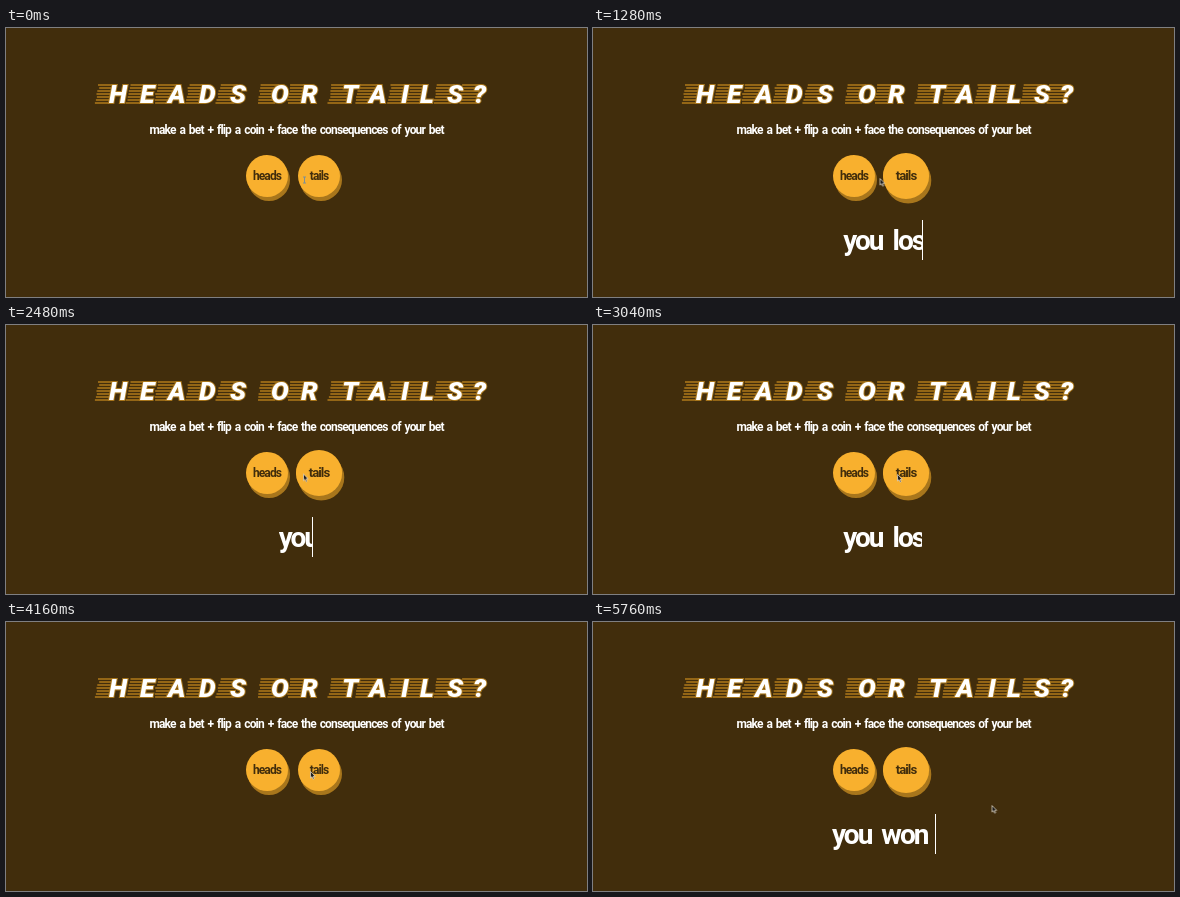
These frames come from a looping animation (581x269 px, 5.8 s). An HTML page:

```html
<!DOCTYPE html>
<html lang="en">
<head>
<meta charset="utf-8">
<title>Heads or tails?</title>
<style>
  :root { --bg: #412d0c; --gold: #f8b02e; --dim: #a8761c; --loop: 5800ms; }
  html, body { margin: 0; width: 100%; height: 100%; overflow: hidden; background: var(--bg); }
  body { position: relative; font: 700 12px Roboto, "Liberation Sans", sans-serif; color: #fff; }
  svg { position: absolute; left: 0; top: 0; overflow: visible; }

  .title { font: italic 900 26.5px Roboto, "Liberation Sans", sans-serif; fill: #fff;
    stroke: var(--dim); stroke-width: 2px; paint-order: stroke; }
  #streaks { stroke: #b07a1a; stroke-width: 1.6; fill: none; }

  .lead { position: absolute; left: 0; width: 581px; top: 92px; margin: 0; line-height: 20px;
    text-align: center; white-space: nowrap; letter-spacing: -.85px; word-spacing: 1.7px; }

  .coin { position: absolute; top: 126.5px; width: 42px; height: 42px; border-radius: 50%;
    background: var(--gold); color: var(--bg); box-shadow: 2px 4px 0 var(--dim);
    line-height: 42px; text-align: center; letter-spacing: -.9px; }
  .heads { left: 240px; }
  .tails { left: 291.5px; animation: landed var(--loop) step-end infinite; }

  .result { position: absolute; left: 0; top: 192px; width: 581px; height: 40px;
    display: flex; justify-content: center; }
  .result span { flex: none; width: 0; height: 40px; overflow: hidden; white-space: nowrap;
    border-right: 1px solid #fff; font-size: 28px; line-height: 42px; opacity: 0;
    letter-spacing: -2px; word-spacing: 5px; }
  .lose { --full: 90px;
    animation: lose var(--loop) step-end infinite, blink calc(var(--loop) / 9) -134ms step-end infinite; }
  .won { --full: 103px;
    animation: won var(--loop) step-end infinite, blink calc(var(--loop) / 9) -134ms step-end infinite; }

  .mouse { animation: move var(--loop) ease-in-out infinite; }
  .arrow { fill: #1d1d1d; stroke: #e8e0d0; stroke-width: .7; animation: arrow var(--loop) step-end infinite; }
  .beam { fill: none; stroke: #7f9096; stroke-width: 1; animation: beam var(--loop) step-end infinite; }

  @keyframes landed {
    0%, 32.2%, 71% { transform: none; }
    5.52%, 36.2%, 77.59% { transform: scale(1.1); }
  }
  @keyframes lose {
    0%, 32.2%, 71%, 100% { width: 0; opacity: 0; }
    5.52%, 36.2% { width: 0; opacity: 1; animation-timing-function: steps(8); }
    22.76%, 53.45% { width: var(--full); opacity: 1; }
  }
  @keyframes won {
    0% { width: 0; opacity: 0; }
    77.59% { width: 0; opacity: 1; animation-timing-function: steps(8); }
    94.83%, 100% { width: var(--full); opacity: 1; }
  }
  @keyframes blink {
    0% { border-color: #fff; }
    50%, 100% { border-color: transparent; }
  }
  @keyframes move {
    0% { transform: translate(298px, 149px); }
    22.07% { transform: translate(286.5px, 150px); }
    30%, 34.5% { transform: translate(261px, 146px); }
    46%, 88.5% { transform: translate(304px, 149px); }
    98%, 100% { transform: translate(398.5px, 183px); }
  }
  @keyframes arrow { 0% { opacity: 0; } 11%, 100% { opacity: 1; } }
  @keyframes beam { 0% { opacity: 1; } 11%, 100% { opacity: 0; } }
</style>
</head>
<body>
<svg width="581" height="269" viewBox="0 0 581 269">
  <path id="streaks"/>
  <text class="title" id="title" y="75">HEADSORTAILS?</text>
</svg>
<p class="lead">make a bet + flip a coin + face the consequences of your bet</p>
<div class="coin heads">heads</div>
<div class="coin tails">tails</div>
<div class="result"><span class="lose">you lose</span><span class="won">you won</span></div>
<svg width="581" height="269" viewBox="0 0 581 269">
  <g class="mouse">
    <path class="arrow" d="M.5 .5V7L2 5.7 3.1 8.2 4.2 7.7 3.2 5.3H5.2Z"/>
    <path class="beam" d="M-1 0H2M.5 0V6M-1 6H2"/>
  </g>
</svg>
<script>
  const word = "HEADSORTAILS?";
  const lefts = [103, 134, 162, 193, 224, 265, 295, 336, 363, 395, 414, 441, 467];
  document.getElementById("title").setAttribute("x", lefts.join(" "));

  let seed = 7;
  const random = () => (seed = seed * 16807 % 2147483647) / 2147483647;

  // Speed lines trail each letter along its slant.
  let path = "";
  [...word].forEach((letter, n) => {
    for (let row = 0; row < 7; row++) {
      const y = 57 + row * 3;
      const slant = (76 - y) * .21;
      const reach = letter === "A" ? (76 - y) * .3 + 2 : letter === "T" && row > 1 ? 8 : 4;
      const start = lefts[n] - 15 + slant + random() * 2;
      path += `M${start.toFixed(1)} ${y}H${(lefts[n] + slant + reach).toFixed(1)}`;
    }
  });
  document.getElementById("streaks").setAttribute("d", path);
</script>
</body>
</html>
```
